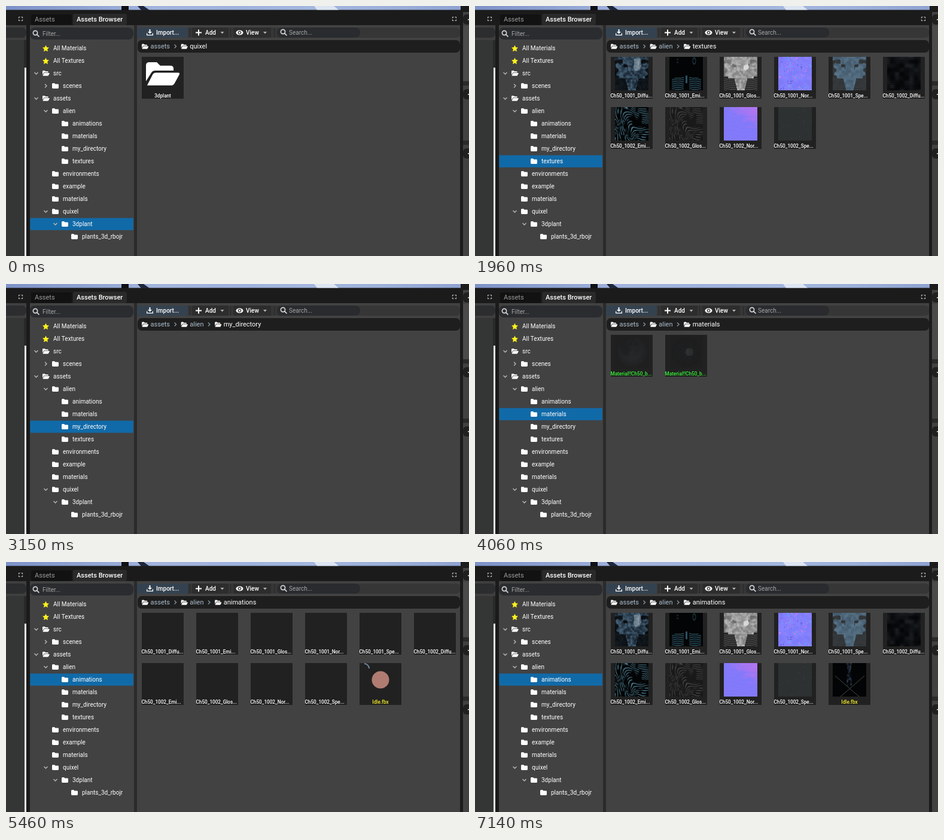
An HTML page with a canvas for the animation above (8120 ms loop, 774x418 px).

```html
<!DOCTYPE html>
<html>
<head>
<meta charset="utf-8">
<title>Assets Browser</title>
<style>
html, body { margin: 0; width: 100%; height: 100%; overflow: hidden; background: #1b1b1b; }
canvas { display: block; }
</style>
</head>
<body>
<canvas id="stage" width="774" height="418"></canvas>
<script>
const LOOP = 8120;
const g = document.getElementById('stage').getContext('2d');
const { abs, sin, hypot, floor, PI } = Math;

// ---------- drawing helpers ----------
function rect(x, y, w, h, color, r = 0) {
  g.fillStyle = color;
  g.beginPath();
  g.roundRect(x, y, w, h, r);
  g.fill();
}
function text(s, x, y, size = 10, color = '#fff', weight = 400, align = 'left') {
  g.font = `${weight} ${size}px Roboto, sans-serif`;
  g.textAlign = align;
  g.fillStyle = color;
  g.fillText(s, x, y);
  return x + g.measureText(s).width;
}
function shape(path, x, y, color = '#fff', sx = 1, sy = sx) {
  g.save();
  g.translate(x, y);
  g.scale(sx, sy);
  g.fillStyle = color;
  g.fill(path);
  g.restore();
}
function line(points, color, width = 1.3) {
  g.strokeStyle = color;
  g.lineWidth = width;
  g.beginPath();
  points.forEach(([x, y]) => g.lineTo(x, y));
  g.stroke();
}
function poly(points, color) {
  g.fillStyle = color;
  g.beginPath();
  points.forEach(([x, y]) => g.lineTo(x, y));
  g.fill();
}

const folder = new Path2D('M0 1.5Q0 0 1.4 0H4L5.4 1.4H9.7Q11 1.4 11 2.8V7.6Q11 9 9.6 9H1.4Q0 9 0 7.6Z');
const openFolder = new Path2D('M0 7.2V1.2Q0 0 1.2 0H3.8L5 1.3H8.6Q9.7 1.3 9.7 2.4V3.2H3.2Q2.3 3.2 1.9 4Z' +
  'M.4 8.8L2.4 4.6Q2.7 4 3.4 4H11.3Q12.1 4 11.7 4.8L10 8.1Q9.6 8.8 8.9 8.8Z');
const star = new Path2D('M5.5 0L7.2 3.6L11 4.1L8.2 6.8L8.9 10.7L5.5 8.8L2.1 10.7L2.8 6.8L0 4.1L3.8 3.6Z');
const importIcon = new Path2D('M4.5 0H6.5V4H9L5.5 7.5L2 4H4.5ZM0 6.5H1.3V9H9.7V6.5H11V10.3H0Z');

const chevronDown = (x, y) => line([[x - 3, y - 1.5], [x, y + 1.5], [x + 3, y - 1.5]], '#bbb');
const chevronRight = (x, y, color = '#bbb') => line([[x - 1.5, y - 3], [x + 1.5, y], [x - 1.5, y + 3]], color);
const caret = (x, y) => poly([[x - 3, y - 1.5], [x + 3, y - 1.5], [x, y + 2]], '#b4b4b4');

function lens(x, y) {
  g.strokeStyle = '#d5d5d5';
  g.lineWidth = 1.7;
  g.beginPath();
  g.arc(x, y, 3.6, 0, 2 * PI);
  g.moveTo(x + 2.7, y + 2.7);
  g.lineTo(x + 6.4, y + 6.4);
  g.stroke();
}
function expandIcon(x, y) {
  for (const [a, b] of [[-1, -1], [1, -1], [1, 1], [-1, 1]])
    line([[x + a, y + 3 * b], [x + 3 * a, y + 3 * b], [x + 3 * a, y + b]], '#bbb', 1.2);
}

// ---------- procedural textures, 56 x 56 ----------
const hash = (x, y, s) => {
  const v = sin(x * 127.1 + y * 311.7 + s * 74.7) * 43758.5453;
  return v - floor(v);
};
function noise(x, y, s = 0) {
  const i = floor(x), j = floor(y);
  const u = (x - i) ** 2 * (3 - 2 * (x - i)), v = (y - j) ** 2 * (3 - 2 * (y - j));
  const top = hash(i, j, s) * (1 - u) + hash(i + 1, j, s) * u;
  const low = hash(i, j + 1, s) * (1 - u) + hash(i + 1, j + 1, s) * u;
  return top * (1 - v) + low * v;
}
const mix = (a, b, k) => a.map((v, i) => v + (b[i] - v) * k);
const clamp = v => Math.min(1, Math.max(0, v));

function texture(shade) {
  const c = document.createElement('canvas');
  c.width = c.height = 56;
  const p = c.getContext('2d');
  for (let y = 0; y < 56; y++)
    for (let x = 0; x < 56; x++) {
      p.fillStyle = `rgb(${shade(x, y).map(Math.round)})`;
      p.fillRect(x, y, 1, 1);
    }
  return c;
}
const BLACK = [3, 4, 5];
const ripple = v => clamp(sin(v) * 1.1 - .1);
// mirrored torso: mottled chest above a tapering column
const body = (x, y) => {
  const d = abs(x - 28);
  return y < 36 ? d < 6 + y * .1 || (noise(d / 6, y / 7, 4) > .38 && d + y * .3 < 35) : d < 11 - (y - 36) * .25;
};
const skirt = (x, y) => {
  const d = abs(x - 28);
  return y > 33 + d * .08 && d > 4 ? ripple((y - 3 * sin(d / 9)) * 2) : 0;
};
const contour = (x, y) => {
  const slope = clamp((x - 12) / 20);
  const v = x * (1 - slope) + y * slope + 7 * noise(x / 15, y / 15, 2) + 1.2 * sin((x + y) / 6);
  return ripple(v * 1.9) * clamp(noise(x / 6, y / 6, 8) * 3 - .6);
};
const ring = (x, y, cx, cy, a, b) => clamp(1 - abs(hypot((x - cx) / a, (y - cy) / b) - 1) * 3);
const head = (x, y) => hypot((x - 37) / 7, (y - 12) / 12) < .75 + .4 * noise(x / 4, y / 4, 7);

const diffuse = (x, y) => {
  const n = noise(x / 3, y / 3, 3);
  if (head(x, y)) return mix([70, 92, 110], [140, 157, 168], n);
  if (body(x, y)) return mix([22, 34, 46], [72, 100, 122], n);
  return mix([7, 10, 13], [34, 46, 56], Math.max(n * .5, skirt(x, y) * .5));
};
const normals = (x, y) => {
  const n = noise(x / 2, y / 2, 6), area = noise(x / 9, y / 7, 12);
  const base = mix([124, 122, 250], [138, 132, 255], noise(x / 5, y / 5, 3));
  if (n > .8 && area > .58) return mix(base, [226, 130, 225], .75);
  if (n < .16 && area > .58) return mix(base, [80, 190, 235], .75);
  return n > .76 && area < .3 ? mix(base, [70, 70, 190], .6) : base;
};
const textures = [
  diffuse,
  (x, y) => mix(BLACK, [72, 134, 158], Math.max(skirt(x, y) * (abs(x - 28) < 25) * .85, ring(x, y, 13, 6, 1.5, 3) * .5,
    ring(x, y, 41, 6, 2.5, 5) * .5, (abs(x - 28) < 1.5 && y > 30 && y < 44) * .6)),
  (x, y) => {
    const n = noise(x / 3, y / 3, 3);
    if (hypot(x - 37, y - 17) < 3 + 3 * n) return [215, 215, 215];
    if (y < 33 || body(x, y)) return mix([100, 100, 100], [186, 186, 186], body(x, y) ? .3 + n * .7 : n * .5);
    return mix([38, 38, 38], [112, 112, 112], skirt(x, y) * .7);
  },
  normals,
  (x, y) => body(x, y) ? mix([66, 88, 106], [92, 119, 140], noise(x / 4, y / 4, 5))
                       : mix([47, 50, 52], [66, 72, 76], Math.max(skirt(x, y) * .5, noise(x / 4, y / 4, 2) * .4)),
  (x, y) => mix([5, 6, 8], [46, 51, 56], noise(x / 8, y / 7, 9) ** 1.5 * (.4 + .5 * ripple(y * 2 + sin(x / 5)))),
  (x, y) => mix(BLACK, [92, 152, 174], contour(x, y) * .85),
  (x, y) => mix([25, 25, 25], [88, 88, 88], contour(x, y) * .75),
  (x, y) => {
    const pink = clamp((x - y * 1.5) / 60 + noise(x / 6, y / 3, 3) * .5 - .1) * .7;
    return mix([128, 122, 251], [205, 115, 235], Math.max(pink, ripple(y * .9 + sin(x / 7) * 2) * .1));
  },
  (x, y) => mix([46, 49, 49], [70, 75, 75], hash(x, y, 2) > .996 ? 1 : 0),
  (x, y) => {
    const d = abs(x - 27);
    const figure = (d < 1.5 + 4 * noise(y / 4, 2, 1) && y < 28) || (abs(d - 3) < 1.5 && y > 26 && y < 38);
    if (figure) return mix([6, 9, 13], [52, 70, 90], noise(x / 2.5, y / 2.5, 4) ** 1.5);
    const cross = clamp(1 - abs(abs(x - 28) - abs(y - 42) * 1.15));
    return mix(BLACK, [85, 85, 85], y > 20 ? cross : 0);
  }
].map(texture);

const sphere = fill => texture((x, y) => {
  const d = hypot(x - 28, y - 28);
  return d > 25 ? [20, 20, 20] : mix(fill(x, y), [8, 10, 12], clamp(d / 32));
});
const materials = [
  sphere((x, y) => hypot(x - 25, y - 20) < 17 ? mix([22, 28, 34], [70, 92, 110], noise(x / 5, y / 5, 2)) : [96, 118, 134]),
  sphere((x, y) => hypot((x - 33) / 7, (y - 28) / 7) < 1 ? [128, 148, 162] : mix([14, 18, 22], [42, 56, 66], contour(x, y)))
];

// ---------- data ----------
const rows = [ // label, depth, icon, chevron
  ['All Materials', 0, 'star'], ['All Textures', 0, 'star'], ['src', 0, 'open', 'down'], ['scenes', 1, '', 'right'],
  ['assets', 0, 'open', 'down'], ['alien', 1, '', 'down'], ['animations', 2], ['materials', 2], ['my_directory', 2],
  ['textures', 2], ['environments', 1], ['example', 1], ['materials', 1], ['quixel', 1, '', 'down'],
  ['3dplant', 2, '', 'down'], ['plants_3d_rbojr', 3]
];
const kinds = ['Diffu', 'Emi', 'Glos', 'Nor', 'Spe'];
const labels = ['1001', '1002'].flatMap(n => kinds.map(k => `Ch50_${n}_${k}...`));
const selection = [[0, 14], [1960, 9], [3150, 8], [4060, 7], [5460, 6]];
const hovers = [[0, -1], [70, 13], [140, 12], [210, 11], [280, -1], [630, 10], [840, 9], [2660, 8], [3570, 7],
  [4830, 6], [6720, 7], [7140, -1]];
const loadTimes = [6300, 5740, 6160, 6790, 6020, 6580, 5530, 5670, 7140, 5600, 5810];
const at = (list, t) => list.findLast(e => e[0] <= t)[1];

// ---------- panels ----------
function surroundings() {
  rect(0, 0, 774, 418, '#1b1b1b');
  const sky = g.createLinearGradient(0, 0, 760, 0);
  ['#7d92c8', '#8ea2d2', '#a3b5de', '#9fb2dd', '#a4b7df', '#9db0da', '#8fa3d2'].forEach((c, i) => sky.addColorStop(i / 6, c));
  rect(0, 0, 760, 6.6, sky);
  rect(193, 0, 12, 7, '#101114');
  poly([[220, 0], [230, 0], [240, 7], [226, 7]], '#20273a');
  poly([[515, 0], [548, 0], [556, 6.6], [520, 6.6]], '#dde5f2');

  // left panel
  rect(0, 32, 34, 386, '#3f3f3f');
  rect(-10, 36, 44, 17, '#2b2d2f', 7);
  rect(0, 57, 30, 361, '#343535');
  rect(30, 57, 4, 46, '#292929');
  rect(31, 103, 3, 315, '#e4e4e4');
  expandIcon(24.5, 21.5);

  // right panel
  rect(764, 10, 10, 408, '#414141');
  rect(764, 33, 10, 92, '#4a4a4a');
  rect(764, 126, 10, 7, '#2a2a2a');
  rect(764, 225, 10, 7, '#2a2a2a');
  for (const y of [14, 139, 238]) {
    rect(764, y, 20, 17, '#202020', 6);
    rect(772, y + 8, 2, 1.5, '#ddd');
  }

  // tabs
  rect(42, 14, 68, 18, '#121212', 3);
  text('Assets', 48, 26, 11, '#9c9c9c');
  rect(112, 13, 90, 19, '#2a2a2a', 3);
  text('Assets Browser', 118, 26, 11, '#fff', 500);
  expandIcon(749.5, 21.5);
  rect(40, 32, 174, 386, '#424242');
  rect(214, 32, 5, 386, '#2b2b2b');
  rect(219, 32, 540, 386, '#424242');
}

function toolbar() {
  rect(219, 36, 540, 17, '#363636', 6);
  rect(219, 36, 85, 17, '#344250', 2);
  shape(importIcon, 235, 39);
  text('Import...', 251, 47.5, 10, '#fff', 500);
  rect(311, 36, 61, 17, '#2d2d2d', 2);
  line([[317, 44.5], [327, 44.5]], '#fff', 2);
  line([[322, 39.5], [322, 49.5]], '#fff', 2);
  text('Add', 333, 47.5, 10, '#fff', 500);
  caret(361.5, 44.5);
  rect(380, 36, 63, 17, '#2d2d2d', 2);
  for (const x of [307.5, 375.5, 448.5]) line([[x, 37], [x, 52]], '#252525', 1);
  g.fillStyle = '#fff';
  g.beginPath();
  g.ellipse(390.5, 44.5, 6, 4, 0, 0, 2 * PI);
  g.fill();
  g.strokeStyle = '#2d2d2d';
  g.lineWidth = 1.2;
  g.beginPath();
  g.arc(390.5, 44.5, 2.2, 0, 2 * PI);
  g.stroke();
  text('View', 401, 47.5, 10, '#fff', 500);
  caret(433, 44.5);
  rect(453, 36, 139, 17, '#292b2e', 8);
  lens(463, 43);
  text('Search...', 473, 48, 10, '#a5a5a5');
}

function tree(t, selected) {
  rect(40, 36, 173, 20, '#2a2c2f', 8);
  lens(49, 45);
  text('Filter...', 61, 50, 10, '#a5a5a5');
  const hover = at(hovers, t);
  rows.forEach(([label, depth, icon, chevron], i) => {
    const y = 60 + 21 * i, x = 50 + 16 * depth;
    if (i === selected) rect(40.4, y + .4, 172.4, 20.4, '#116aa8');
    else if (i === hover) rect(40.4, y + .4, 172.4, 20.4, '#4e4e4e');
    if (chevron === 'down') chevronDown(x + .5, y + 10.5);
    if (chevron === 'right') chevronRight(x + .5, y + 10.5);
    if (icon === 'star') shape(star, x + 11, y + 5.5, '#fdf01c');
    else shape(icon ? openFolder : folder, x + 11, y + 6);
    text(label, x + 29, y + 14);
  });
}

function breadcrumb(parts) {
  rect(220, 57, 539, 21, '#1e1e1e', 7);
  let x = 227;
  parts.forEach((part, i) => {
    const last = i === parts.length - 1;
    shape(openFolder, x, 63.5, '#fff', .95);
    const end = text(part, x + 14.6, 71, 11, last ? '#fff' : '#adbfce');
    if (!last) chevronRight(end + 9, 67.5, '#8898a5');
    x = end + 18.6;
  });
}

// ---------- content ----------
const cell = i => [227 + 91 * (i % 6), 85 + 84 * floor(i / 6)];
const picture = (image, x, y) => g.drawImage(image, x + 7.2, y + .4, 55.6, 55.6);

function tile(i, label, color = '#fff', centred = false) {
  const [x, y] = cell(i);
  rect(x, y, 70, 70, '#212121');
  text(label, centred ? x + 35 : x - .5, y + 68, 8.2, color, 500, centred ? 'center' : 'left');
}

function textureGrid(t, loading) {
  labels.forEach((label, i) => {
    const [x, y] = cell(i);
    tile(i, label);
    if (!loading || t >= loadTimes[i]) picture(textures[i], x, y);
    else if (t >= 5810) g.drawImage(textures[i], 0, 0, 56, 1, x + 7.2, y + .4, 55.6, .5);
  });
}

function idleTile(t) {
  const [x, y] = cell(10);
  tile(10, 'Idle.fbx', '#f6ee2c', true);
  if (t >= loadTimes[10]) picture(textures[10], x, y);
  else {
    g.fillStyle = '#b07c72';
    g.beginPath();
    g.arc(x + 35, y + 28, 14.5, 0, 2 * PI);
    g.fill();
  }
  if (t < 6020) {
    const turn = Math.min(5, floor((t - 5460) / 70)) * .4 * PI;
    g.strokeStyle = '#71869a';
    g.lineWidth = 2;
    g.beginPath();
    g.arc(x + 8, y + 9, 8, turn - PI / 2, turn);
    g.stroke();
  }
}

function content(t, selected) {
  if (selected === 14) {
    tile(0, '3dplant', '#fff', true);
    shape(openFolder, 234, 94, '#fff', 4.75, 4.4);
  } else if (selected === 9) {
    textureGrid(t, false);
  } else if (selected === 7) {
    const step = Math.min(4, floor((t - 4060) / 70));
    materials.forEach((image, i) => {
      tile(i, 'Material!!Ch50_b...', '#35f435');
      g.globalAlpha = .15 + .85 * step / 4;
      picture(image, ...cell(i));
      g.globalAlpha = 1;
    });
  } else if (selected === 6) {
    textureGrid(t, true);
    idleTile(t);
  }
}

function draw(now) {
  const t = now % LOOP;
  const selected = at(selection, t);
  surroundings();
  toolbar();
  tree(t, selected);
  breadcrumb(selected === 14 ? ['assets', 'quixel'] : ['assets', 'alien', rows[selected][0]]);
  content(t, selected);
}

let start;
function tick(now) {
  start ??= now;
  draw(now - start);
  requestAnimationFrame(tick);
}
draw(0);
requestAnimationFrame(tick);
</script>
</body>
</html>
```
